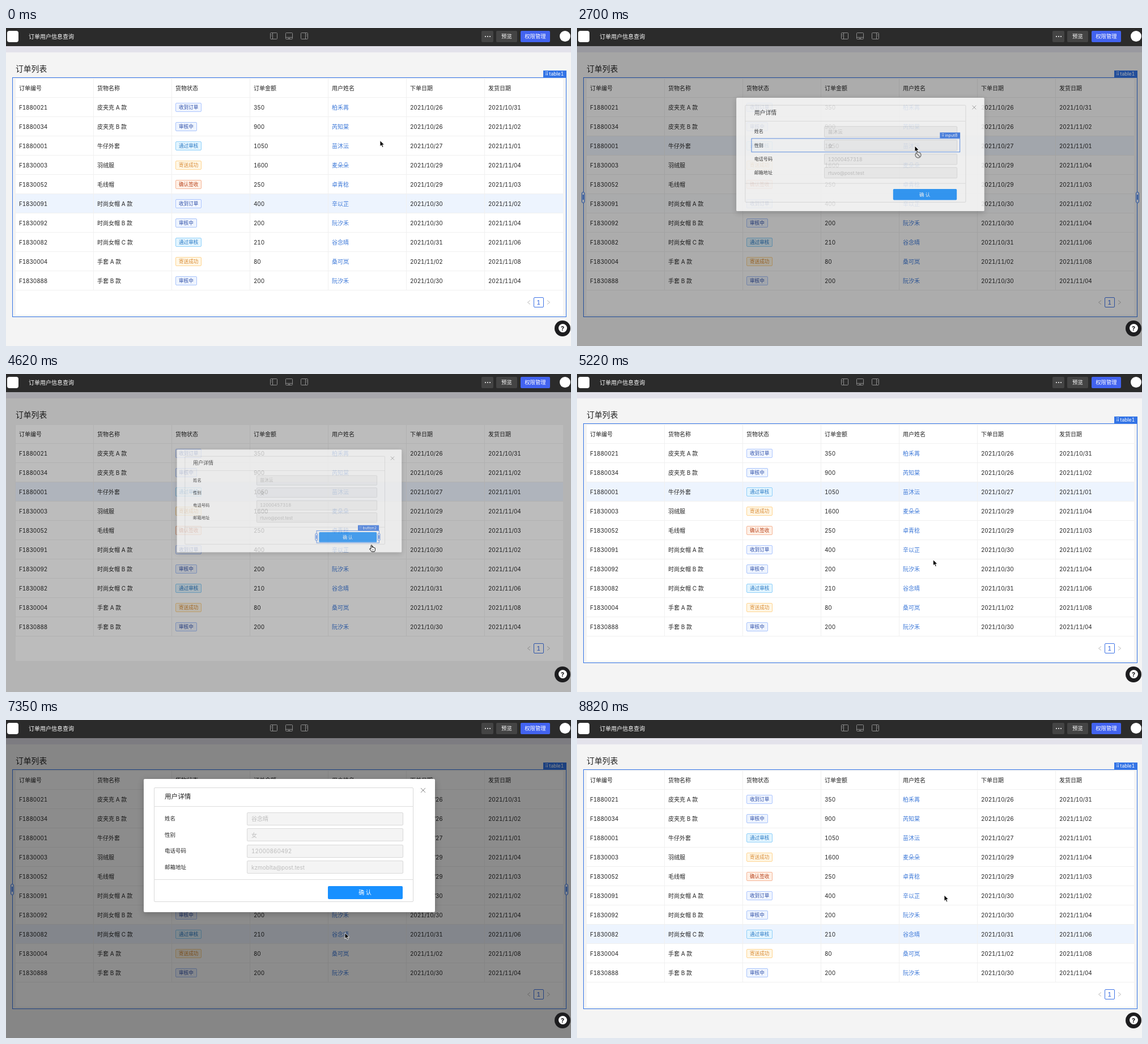
Recreate the animation shown at these times as an HTML page. Size 997 px wide and 561 px high, loop 9.36 s.

```html
<!DOCTYPE html>
<html lang="zh-CN">
<head>
<meta charset="utf-8">
<title>订单用户信息查询</title>
<style>
html, body { margin: 0; width: 100%; height: 100%; overflow: hidden; }
#stage { position: relative; width: 997px; height: 561px; overflow: hidden; background: #f4f4f4;
  font-family: Inter, "Noto Sans CJK SC", "Noto Sans CJK", sans-serif; font-feature-settings: "tnum"; }
#stage div, #stage svg { position: absolute; box-sizing: border-box; }
.t { line-height: 20px; white-space: pre; }
.num { letter-spacing: -.14px; }
.layer { left: 0; top: 0; width: 997px; height: 561px; }
.sel { border: 1.4px solid #3374e6; }
.label { background: #3374e6; color: #fff; }
.grip { border: 1px solid #3374e6; border-radius: 3px; background: #e6eeff; }
.grip::after { content: ""; position: absolute; left: 1px; right: 1px; top: 25%; bottom: 25%;
  border-left: 1px solid #3374e6; border-right: 1px solid #3374e6; }
</style>
</head>
<body>
<div id="stage"></div>
<script>
const LOOP = 9360;
const stage = document.getElementById('stage');

function box(parent, x, y, w, h, css = '', cls = '') {
  const el = document.createElement('div');
  el.className = cls;
  el.style.cssText = `left:${x}px;top:${y}px;width:${w}px;height:${h}px;${css}`;
  parent.append(el);
  return el;
}
function text(parent, x, cy, size, color, str, css = '', cls = '') {
  const el = document.createElement('div');
  el.className = 't ' + cls;
  el.style.cssText = `left:${x}px;top:${cy - 10}px;font-size:${size}px;color:${color};${css}`;
  el.textContent = str;
  parent.append(el);
  return el;
}
function label(parent, x, cy, size, color, w, str, css = '') {
  return text(parent, x, cy, size, color, str, `width:${w}px;text-align:center;${css}`);
}
function layer(css = '') {
  const el = box(stage, 0, 0, 997, 561, css);
  el.className = 'layer';
  return el;
}
function svg(parent, x, y, w, h, body) {
  const holder = box(parent, x, y, w, h);
  holder.innerHTML = `<svg width="${w}" height="${h}" style="left:0;top:0;overflow:visible">${body}</svg>`;
  return holder;
}
const show = (el, on) => { el.style.display = on ? 'block' : 'none'; };

// Outline with a name tag and optional side grips
function selection(parent, x, y, w, h, name, tagW, gripH, gripY) {
  const el = box(parent, x, y, w, h, '', 'sel');
  const tag = box(el, w - tagW - 1.4, -13, tagW, 12, '', 'label');
  for (let i = 0; i < 6; i++)
    box(tag, 4 + (i % 2) * 2.8, 2.7 + (i >> 1) * 2.5, 1.2, 1.2, 'background:#fff');
  el.nameTag = text(tag, 11, 6, 8.6, '#fff', name);
  el.grips = gripH ? [-4.4, w - 4.4].map(gx => box(el, gx, gripY, 6, gripH, '', 'grip')) : [];
  return el;
}

/* ---------- page ---------- */
const page = layer();
box(page, 0, 32, 997, 11, 'background:#e3e2eb');
text(page, 17, 72, 13.8, '#222', '订单列表', 'font-weight:500');
box(page, 17, 90, 965.5, 415.5, 'background:#fff');

const columns = ['订单编号', '货物名称', '货物状态', '订单金额', '用户姓名', '下单日期', '发货日期'];
const tags = {
  收到订单: ['#3050a8', '#f0f5ff', '#adc6ff'],
  审核中: ['#3050a8', '#eef4ff', '#a9c4fb'],
  通过审核: ['#2878c4', '#e3f5ff', '#8fd0fa'],
  寄送成功: ['#d98b35', '#fff7e6', '#ffd591'],
  确认签收: ['#b8451f', '#fff0e6', '#f5b596']
};
const orders = [
  'F1880021,皮夹克 A 款,收到订单,350,柏禾苒,2021/10/26,2021/10/31',
  'F1880034,皮夹克 B 款,审核中,900,芮知棠,2021/10/26,2021/11/02',
  'F1880001,牛仔外套,通过审核,1050,苗沐沄,2021/10/27,2021/11/01',
  'F1830003,羽绒服,寄送成功,1600,麦朵朵,2021/10/29,2021/11/04',
  'F1830052,毛线帽,确认签收,250,卓青稔,2021/10/29,2021/11/03',
  'F1830091,时尚女帽 A 款,收到订单,400,辛以芷,2021/10/30,2021/11/02',
  'F1830092,时尚女帽 B 款,审核中,200,阮汐禾,2021/10/30,2021/11/04',
  'F1830082,时尚女帽 C 款,通过审核,210,谷念晴,2021/10/31,2021/11/06',
  'F1830004,手套 A 款,寄送成功,80,桑可岚,2021/11/02,2021/11/08',
  'F1830888,手套 B 款,审核中,200,阮汐禾,2021/10/30,2021/11/04'
].map(s => s.split(','));

const COL = 138, ROW = 33.93, TOP = 123.3;
const colX = c => 23 + c * COL;
const rowY = r => TOP + r * ROW;

const rowBg = orders.map((_, r) => box(page, 17, rowY(r), 965.5, ROW, 'background:#edf4fe'));
for (let r = 0; r <= 10; r++) box(page, 17, Math.round(rowY(r)) - 1, 965.5, 1, 'background:#f0f0f0');
for (let c = 0; c < 7; c++) box(page, 16 + c * COL, 90, 1, 372, 'background:#f0f0f0');
columns.forEach((s, c) => text(page, colX(c), 106, 10, '#222', s, 'font-weight:500'));

orders.forEach((cells, r) => cells.forEach((s, c) => {
  const y = rowY(r) + ROW / 2;
  if (c === 2) {
    const [ink, fill, edge] = tags[s], w = s.length * 8.6 + 12;
    box(page, colX(c), y - 8, w, 16, `background:${fill};border:1px solid ${edge};border-radius:2px`);
    text(page, colX(c) + 6, y, 8.6, ink, s);
  } else {
    text(page, colX(c), y, 10, c === 4 ? '#3c78d8' : '#262626', s, '', c === 1 || c === 4 ? '' : 'num');
  }
}));

const chevron = (x, d) => svg(page, x, 480, 5, 8,
  `<path d="${d}" fill="none" stroke="#bdbdbd"/>`);
chevron(920, 'M5 .5L.5 4L5 7.5');
chevron(954.5, 'M0 .5L4.5 4L0 7.5');
box(page, 931, 475, 17.5, 17.5, 'border:1px solid #3f74e6;border-radius:2px;background:#fff');
label(page, 931, 484, 10, '#3f6fe0', 17.5, '1', 'font-weight:500');

const tableSel = selection(page, 11, 86.5, 978, 423.5, 'table1', 41, 20, 201);

/* ---------- dialog ---------- */
const mask = layer('background:#000');
const dialog = layer();
box(dialog, 242.5, 103.5, 514, 235.5, 'background:#fff;border-radius:2px;box-shadow:0 3px 12px rgba(0,0,0,.22)');
svg(dialog, 732, 120, 8, 8, '<path d="M0 0L8 8M8 0L0 8" stroke="#888" stroke-width="1"/>');
box(dialog, 260.5, 118.5, 458.5, 202.5, 'border:1px solid #d9d9d9;border-radius:2px');
text(dialog, 280, 135, 11.6, '#222', '用户详情', 'font-weight:500');
for (const y of [152, 281]) box(dialog, 261, y, 457, 1, 'background:#dedede');
const FIELD = 28.6;
const fields = ['姓名', '性别', '电话号码', '邮箱地址'].map((s, i) => {
  const y = 174 + i * FIELD;
  text(dialog, 280, y, 9.5, '#262626', s);
  box(dialog, 424.5, y - 11.5, 276.5, 23, 'background:#f4f4f4;border:1px solid #d9d9d9;border-radius:2px');
  return text(dialog, 433, y, 10, '#bdbdbd', '');
});
box(dialog, 567.5, 292.5, 132, 23, 'background:#1890ff;border-radius:2px');
label(dialog, 567.5, 304, 10, '#fff', 132, '确 认');
const fieldSel = selection(dialog, 274, 0, 433, 29, 'input8', 42);
const buttonSel = selection(dialog, 562, 289, 143.5, 29, 'button2', 48, 18, 4.5);

/* ---------- top bar ---------- */
const bar = layer('height:32px');
box(bar, 0, 0, 997, 32, 'background:#2b2b2b');
box(bar, 2, 5, 20, 20, 'background:#fff;border-radius:4px');
text(bar, 40, 15, 10, '#fff', '订单用户信息查询', 'font-weight:500');
['M4.5 0V12M1.8 3.5H3M1.8 6H3', 'M0 8.5H13M5 10.4H8', 'M8.5 0V12M10 3.5H11.2M10 6H11.2'].forEach((d, i) =>
  svg(bar, 466 + i * 27, 8, 13, 12,
    `<g fill="none" stroke="#8c8c8c"><rect x=".5" y=".5" width="12" height="11" rx="1"/><path d="${d}"/></g>`));
[[839, 21, '', '#444'], [865, 37, '预览', '#444'], [908, 52, '权限管理', '#4263f0']].forEach(([x, w, s, fill]) => {
  box(bar, x, 5, w, 20, `background:${fill};border-radius:2px`);
  label(bar, x, 15, 9.4, '#fff', w, s);
});
for (let i = 0; i < 3; i++) box(bar, 844.6 + i * 4, 14, 2, 2, 'background:#fff;border-radius:50%');
box(bar, 977, 5, 19, 19, 'background:#fff;border-radius:50%');

box(stage, 968, 515.5, 28, 28, 'background:#1d1d1f;border-radius:50%');
box(stage, 974.5, 522, 15, 15, 'background:#fff;border-radius:50%');
label(stage, 974.5, 529.5, 11, '#1d1d1f', 15, '?', 'font-weight:700');

/* ---------- pointer ---------- */
const arrow = svg(stage, 0, 0, 10, 14,
  '<path d="M0 0V10.4L2.4 8.2L4 12L5.9 11.2L4.3 7.5H7.6Z" fill="#000" stroke="#fff" stroke-width=".9"/>');
const hand = svg(stage, 0, 0, 12, 14,
  '<path d="M-1 1Q0-.6 1 1V4.4Q2-.1 2.8 4.8Q4 3.4 4.7 5.2Q6.4 4.4 6.4 6.5V8.3Q6.4 10.5 5.2 12H.2L-3.4 7.3Q-3.6 5.4-1 7.2Z" fill="#fff" stroke="#111" stroke-width="1"/><path d="M1.2 8V10M3.2 8V10" stroke="#111" stroke-width=".7"/>');
const denied = svg(stage, 0, 0, 12, 12,
  '<circle cx="6" cy="6" r="5" fill="#ddd" fill-opacity=".6" stroke="#777" stroke-width="1.4"/><path d="M2.5 2.5L9.5 9.5" stroke="#777" stroke-width="1.4"/>');

/* ---------- timing ---------- */
const path = [
  [0, 660, 198.5], [900, 660, 198.5], [1500, 623, 209], [2050, 596, 208], [2900, 596, 208],
  [3400, 601, 220], [4250, 645, 301.5], [4800, 645, 301.5], [5850, 598, 375.5],
  [7400, 598, 375.5], [8250, 643, 303], [8520, 643, 303], [8820, 648, 309]
];
const visits = [
  { pick: 2450, open: 2656, close: 4538, ox: 499.5, oy: 232, row: 2,
    data: ['苗沐沄', '女', '12000457318', 'rtuvo@post.test'] },
  { pick: 6160, open: 6289, close: 8500, ox: 598, oy: 377, row: 7,
    data: ['谷念晴', '女', '12000860492', 'kzmoblta@post.test'] }
];
const ZOOM = 200, FADE = 300;
const clamp = v => Math.max(0, Math.min(1, v));

function bezier(x1, y1, x2, y2) {
  const f = (a, b, s) => 3 * (1 - s) * (1 - s) * s * a + 3 * (1 - s) * s * s * b + s * s * s;
  return x => {
    let lo = 0, hi = 1;
    for (let i = 0; i < 24; i++) {
      const m = (lo + hi) / 2;
      if (f(x1, x2, m) < x) lo = m; else hi = m;
    }
    return f(y1, y2, (lo + hi) / 2);
  };
}
const easeIn = bezier(.08, .82, .17, 1);
const easeOut = bezier(.78, .14, .15, .86);

function pointer(t) {
  let i = 0;
  while (i < path.length - 2 && t >= path[i + 1][0]) i++;
  const [t0, x0, y0] = path[i], [t1, x1, y1] = path[i + 1];
  const k = clamp((t - t0) / (t1 - t0)), e = k * k * (3 - 2 * k);
  return [x0 + (x1 - x0) * e, y0 + (y1 - y0) * e];
}

function render(t) {
  const [x, y] = pointer(t);
  const visit = visits.find(v => t >= v.open && t < v.close + ZOOM);
  const closing = !!visit && t >= visit.close;

  // Row highlight cross-fades at each pick
  const first = clamp((t - visits[0].pick) / FADE), second = clamp((t - visits[1].pick) / FADE);
  rowBg.forEach((el, r) => {
    el.style.opacity = r === 5 ? 1 - first : r === 2 ? first * (1 - second) : r === 7 ? second : 0;
  });

  show(tableSel, !closing);
  const picked = visits.some(v => t >= v.pick && t < v.close);
  tableSel.grips.forEach(g => show(g, picked));

  show(mask, visit);
  show(dialog, visit);
  let onField = false, onButton = false;
  if (visit) {
    const p = closing ? 1 - easeOut((t - visit.close) / ZOOM) : easeIn(clamp((t - visit.open) / ZOOM));
    mask.style.opacity = .45 * Math.pow(p, 1.6);
    dialog.style.opacity = p;
    dialog.style.transformOrigin = `${visit.ox}px ${visit.oy}px`;
    dialog.style.transform = p < 1 ? `scale(${.2 + .8 * p})` : 'none';
    fields.forEach((el, i) => { el.textContent = visit.data[i]; });

    const i = Math.floor((y - 159.9) / FIELD);
    onField = !closing && i >= 0 && i < 4;
    onButton = closing || (y > 289 && y < 318);
    if (onField) {
      fieldSel.style.top = 159.9 + i * FIELD - 1 + 'px';
      fieldSel.nameTag.textContent = 'input' + (7 + i);
    }
  }
  show(fieldSel, onField);
  show(buttonSel, onButton);
  buttonSel.grips.forEach(g => show(g, closing));

  const r = Math.floor((y - TOP) / ROW);
  const dy = Math.abs(y - rowY(r) - ROW / 2);
  const onLink = !visit && x > 575 && x < 605 && dy < 8;
  const useHand = onButton || onLink;
  show(hand, useHand);
  show(arrow, !useHand);
  show(denied, onField);
  hand.style.transform = arrow.style.transform = `translate(${x}px,${y}px)`;
  denied.style.transform = `translate(${x}px,${y + 10}px)`;
}

const start = performance.now();
function tick() {
  render((performance.now() - start) % LOOP);
  requestAnimationFrame(tick);
}
tick();
</script>
</body>
</html>
```
